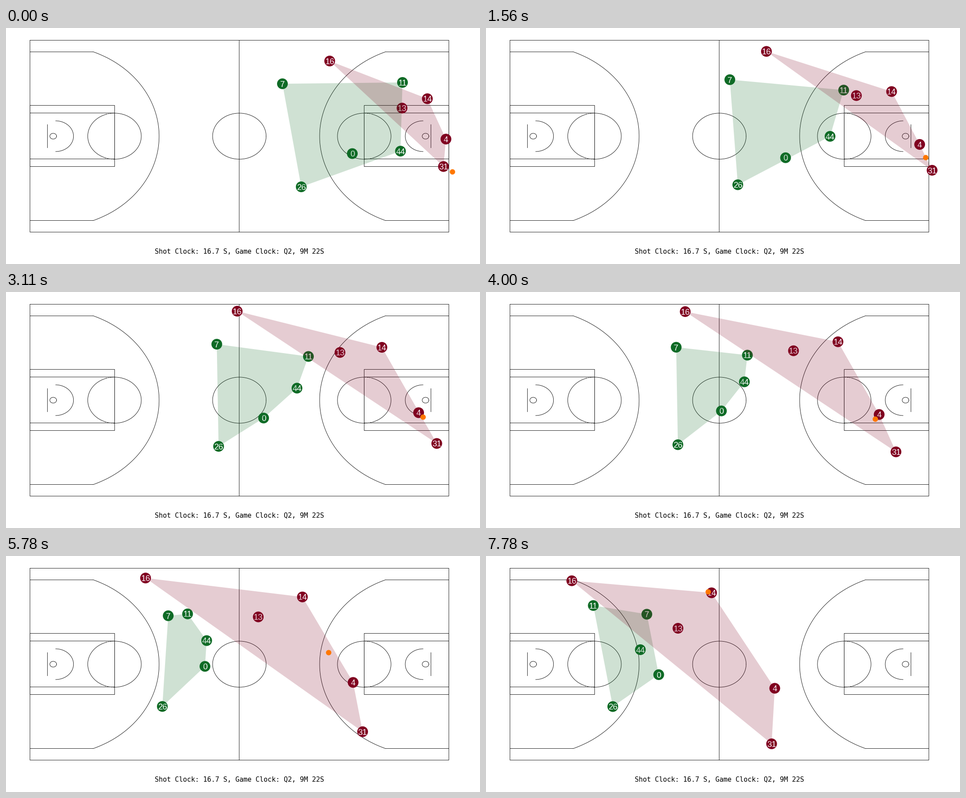
A matplotlib script for the animation above (8000 ms loop, 1058x529 px).

```python
import matplotlib.pyplot as plt
import numpy as np
from matplotlib.animation import FuncAnimation
from matplotlib.patches import Circle, Polygon

W, H, DPI = 1058, 529, 64
PT = 72 / DPI                      # points per pixel
LOOP, TICK, STEPS = 8000, 20, 36   # ms, ms, poses per loop
GREEN, RED, ORANGE = "#0f6b26", "#800020", "#ff7700"

# Court box in pixels; 94 x 50 feet
X0, X1, Y0, Y1 = 52.6, 988.2, 27, 457
FX, FY = (X1 - X0) / 94, (Y1 - Y0) / 50
MX, MY = (X0 + X1) / 2, (Y0 + Y1) / 2

# Each player runs a smooth path through four points
KEYS = np.array([0, 14, 22, 35])
HOME = {
    "7": [(617, 125), (470.5, 117), (385, 131), (359, 130.5)],
    "11": [(885, 122), (675, 144.5), (489, 136), (239.5, 111)],
    "44": [(880.5, 276), (649.5, 215.5), (507, 191.5), (344.5, 210)],
    "0": [(773, 281.5), (575, 282.5), (481, 251.5), (385.5, 266)],
    "26": [(659, 356), (474.5, 346), (386, 339), (283, 337.5)],
}
AWAY = {
    "16": [(722.5, 74), (516, 43), (374, 47), (191.5, 55.5)],
    "14": [(940.5, 158.5), (839, 124), (725, 100), (503.5, 82.5)],
    "13": [(884, 179.5), (745.5, 135.5), (623.5, 132), (428.5, 162)],
    "4": [(982, 249), (921, 270.5), (827, 278.5), (644.5, 296.5)],
    "31": [(976.5, 310.5), (961.5, 339.5), (857, 378), (637.5, 421)],
}
# Inbound, dribble up the court, pass: straight lines between touches
TOUCHES = [0, 7, 14, 18, 22, 24, 29, 35]
BALL = np.array([(996.5, 322.5), (981.5, 290.5), (931, 280.5), (869, 285),
                 (824.5, 279.5), (797, 276), (605, 127.5), (496, 80.5)])


def smooth(points):
    """Cubic Hermite curve through the points, sampled at every step."""
    p = np.array(points)
    m = np.gradient(p, KEYS, axis=0, edge_order=2)
    s = np.arange(STEPS)
    k = np.clip(np.searchsorted(KEYS, s, side="right") - 1, 0, len(KEYS) - 2)
    h = (KEYS[k + 1] - KEYS[k])[:, None]
    u = (s - KEYS[k])[:, None] / h
    rise = u * u * (3 - 2 * u)
    return (p[k] * (1 - rise) + p[k + 1] * rise
            + h * u * (1 - u) * (m[k] * (1 - u) - m[k + 1] * u))


def hull(points):
    """Convex hull by monotone chain."""
    pts = sorted(map(tuple, points))

    def chain(seq):
        out = []
        for p in seq:
            while len(out) > 1:
                (qx, qy), (rx, ry) = out[-2:]
                if (rx - qx) * (p[1] - qy) - (ry - qy) * (p[0] - qx) > 0:
                    break
                out.pop()
            out.append(p)
        return out[:-1]

    return chain(pts) + chain(pts[::-1])


fig = plt.figure(figsize=(W / DPI, H / DPI), dpi=DPI, facecolor="white")
ax = fig.add_axes([0, 0, 1, 1])
ax.set(xlim=(0, W), ylim=(H, 0))
ax.axis("off")


def line(x, y, **style):
    ax.plot(x, y, color="black", lw=0.85 * PT, zorder=1, **style)


def box(xa, xb, ya, yb):
    line([xa, xb, xb, xa, xa], [ya, ya, yb, yb, ya])


def arc(cx, rx, ry, a0, a1, flip=1, **style):
    a = np.radians(np.linspace(a0, a1, 120))
    line(cx + flip * rx * np.cos(a) + 0.5, MY + ry * np.sin(a) + 0.5, **style)


def half_court(flip):
    def at(feet):
        return (X0 if flip > 0 else X1) + flip * feet * FX

    hoop, foul = at(5.25), at(19)
    cut = np.arcsin(22 / 23.75)
    deg = np.degrees(cut)
    arc(hoop, 23.75 * FX, 23.75 * FY, -deg, deg, flip)
    for y in (Y0 + 3 * FY, Y1 - 3 * FY):
        line([at(0), at(5.25 + 23.75 * np.cos(cut))], [y, y])
    for half in (8, 6):
        box(at(0), foul, MY - half * FY, MY + half * FY - 0.4)
    arc(foul, 6 * FX, 6 * FY, -90, 90, flip)
    arc(foul, 6 * FX, 6 * FY, 108, 252, flip)
    for a in (90, 252):
        arc(foul, 6 * FX, 6 * FY, a, a + 18, flip, dashes=(3.7, 1.6),
            dash_capstyle="butt")
    arc(at(5.8), 4 * FX, 4 * FY, -90, 90, flip)
    arc(hoop, 0.75 * FX, 0.75 * FY, 0, 360)
    line([at(4), at(4)], [MY - 3 * FY, MY + 3 * FY])


box(X0, X1, Y0, Y1)
line([MX, MX], [Y0, Y1])
arc(MX, 6 * FX, 6 * FY, 0, 360)
half_court(1)
half_court(-1)

ax.text(MX + 0.6, 506, "Shot Clock: 16.7 S, Game Clock: Q2, 9M 22S",
        family="DejaVu Sans Mono", size=15 * PT, ha="center", va="baseline")


class Team:
    def __init__(self, players, color, z):
        self.paths = [smooth(points) for points in players.values()]
        self.dots, self.labels = [], []
        for i, name in enumerate(players):
            order = z + i * 0.01
            self.dots.append(ax.add_patch(
                Circle((0, 0), 12, fc=color, lw=0, zorder=order)))
            self.labels.append(ax.text(
                0, 0, name, color="white", family="Liberation Sans",
                size=18.5 * PT, ha="center", va="baseline", zorder=order))
        self.area = ax.add_patch(Polygon(
            [(0, 0), (1, 0), (0, 1)], fc=color, alpha=0.2, lw=0, zorder=z + 2))

    def show(self, step):
        spots = [path[step] for path in self.paths]
        for (x, y), dot, label in zip(spots, self.dots, self.labels):
            dot.center = x, y
            label.set_position((x, y + 6.7))
        self.area.set_xy(hull(spots))


teams = [Team(HOME, GREEN, 2), Team(AWAY, RED, 3)]
ball = ax.add_patch(Circle((0, 0), 6, fc=ORANGE, lw=0, zorder=6))


def update(tick):
    # The pose holds for a 36th of the loop; round up within a tick
    step = int((tick + 0.75) * TICK * STEPS / LOOP)
    for team in teams:
        team.show(step)
    ball.center = [np.interp(step, TOUCHES, axis) for axis in BALL.T]


anim = FuncAnimation(fig, update, frames=LOOP // TICK, interval=TICK,
                     init_func=lambda: update(0), repeat=True, repeat_delay=0)
plt.show()
```
